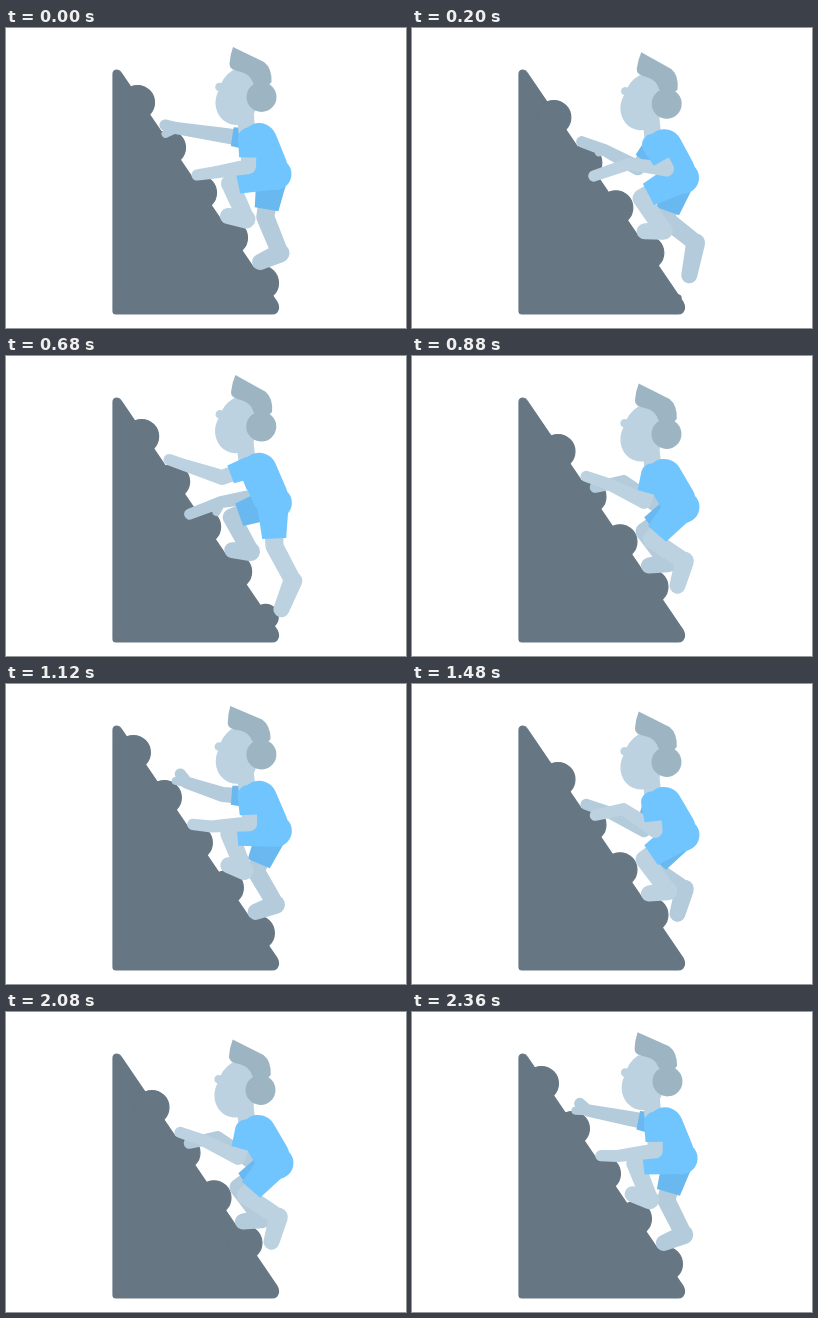
An HTML page for the animation above (2400 ms loop, 400x300 px).

```html
<!DOCTYPE html>
<html lang="en">
<head>
<meta charset="utf-8">
<title>Climber</title>
<style>
html, body { margin: 0; width: 100%; height: 100%; overflow: hidden; background: #fff; }
svg { display: block; width: 400px; height: 300px; }
.rock { fill: #667683; stroke: #667683; stroke-width: 1.2; }
.skin { fill: #bcd2e0; }
.skin.far { fill: #b3cbdb; }
.cloth { fill: #70c5ff; }
.cloth.far { fill: #69b9f0; }
.hair { fill: #9db5c3; }
</style>
</head>
<body>
<svg viewBox="0 0 400 300">
  <path class="rock" d="M107 46Q107 42 111 42Q113.5 42 115 44.5L271 274Q274 280 271 284Q269 286 266 286H110Q107 286 107 283Z"/>
  <path class="rock" id="rocks"/>
  <path class="skin far" id="farArm"/>
  <path class="cloth far" id="farSleeve"/>
  <path class="skin far" id="farLeg"/>
  <path class="cloth far" id="farShorts"/>
  <path class="skin" id="neck"/>
  <g id="head">
    <path class="skin" d="M213 62Q216 49 227 42L248 46L250.500 75A20.500 22 0 0 1 209.500 75Q209.500 68 213 62Z"/>
    <circle class="skin" cx="213.500" cy="59" r="4.300"/>
    <path class="hair" d="M227 19L258 34Q266 40 265.500 54L256 64L247 55Q244 46 235 44Q223 42 223.500 36Q224 27 227 19Z"/>
    <circle class="hair" cx="255.500" cy="69" r="15"/>
  </g>
  <path class="skin" id="nearLeg"/>
  <path class="cloth" id="nearShorts"/>
  <path class="cloth" id="torso"/>
  <path class="skin" id="nearArm"/>
  <path class="cloth" id="nearSleeve"/>
</svg>
<script>
const LOOP = 2400, STRIDE = 1200, STEP = 600, TICK = 40;

// Bézier points: "hold" rides down with the rock, "reach" moves up to the next one
const WRIST = {
  reach: [[205, 145], [240, 158], [194, 86], [170, 100]],
  hold: [[170, 100], [211, 138], [205, 145]]
};
const FINGERS = {
  reach: [[191, 147], [164, 198], [209, 58], [159, 97]],
  hold: [[159, 97], [191, 147]]
};
const HEEL = {
  reach: [[274, 225], [325, 233], [221, 169], [240, 191]],
  hold: [[240, 191], [274, 225]]
};
const TOE = {
  reach: [[254, 234], [333, 312], [206, 146], [222, 188]],
  hold: [[222, 188], [254, 234]]
};

const el = id => document.getElementById(id);
const set = (id, d) => el(id).setAttribute('d', d);
const clamp = (v, lo = 0, hi = 1) => Math.max(lo, Math.min(hi, v));
const mix = (p, q, k) => [p[0] + (q[0] - p[0]) * k, p[1] + (q[1] - p[1]) * k];
const fmt = p => p[0].toFixed(2) + ' ' + p[1].toFixed(2);
const polar = (p, r, a) => [p[0] + r * Math.cos(a), p[1] + r * Math.sin(a)];
const angle = (p, q) => Math.atan2(q[1] - p[1], q[0] - p[0]);
const dist = (p, q) => Math.hypot(q[0] - p[0], q[1] - p[1]);

const bezier = (pts, u) => pts.length === 1 ? pts[0]
  : bezier(pts.slice(1).map((p, i) => mix(pts[i], p, u)), u);

// middle joint of a two-bone chain, bent to the given side
function bend(from, to, l1, l2, side) {
  const d = dist(from, to);
  const a = Math.acos(clamp((l1 * l1 + d * d - l2 * l2) / (2 * l1 * d), -1, 1));
  return polar(from, l1, angle(from, to) + side * a);
}

// outline around two circles
function limb(p, r, q, s) {
  const a = angle(p, q);
  const b = Math.acos(clamp((r - s) / (dist(p, q) || 1), -1, 1));
  const big = b < Math.PI / 2 ? 1 : 0;
  return `M${fmt(polar(p, r, a + b))}A${r} ${r} 0 ${big} 1 ${fmt(polar(p, r, a - b))}` +
    `L${fmt(polar(q, s, a - b))}A${s} ${s} 0 ${1 - big} 1 ${fmt(polar(q, s, a + b))}Z`;
}

// round at p, cut straight at q
function cuff(p, r, q, s) {
  const a = angle(p, q), h = Math.PI / 2;
  return `M${fmt(polar(p, r, a + h))}A${r} ${r} 0 0 1 ${fmt(polar(p, r, a - h))}` +
    `L${fmt(polar(q, s, a - h))}L${fmt(polar(q, s, a + h))}Z`;
}

function drawArm(side, phase, shoulder) {
  const u = phase / STEP % 1, part = phase < STEP ? 'reach' : 'hold';
  const wrist = bezier(WRIST[part], u), tip = bezier(FINGERS[part], u);
  const elbow = bend(shoulder, wrist, 28, 38, -1);
  let d = limb(shoulder, 8, elbow, 7.5) + limb(elbow, 7.5, wrist, 6) + limb(wrist, 6, tip, 5.6);
  if (side === 'far') {
    const grip = Math.abs(Math.cos(2 * Math.PI * phase / STRIDE));
    const thumb = polar(wrist, 12 * grip, angle(wrist, tip) - Math.PI / 4);
    d += limb(wrist, 5, thumb, 4);
  }
  set(side + 'Arm', d);
  const end = polar(shoulder, 19, angle(shoulder, elbow));
  set(side + 'Sleeve', cuff(shoulder, 11, end, 9.5));
}

function drawLeg(side, phase, hip) {
  const u = phase / STEP % 1, part = phase < STEP ? 'hold' : 'reach';
  const heel = bezier(HEEL[part], u), toe = bezier(TOE[part], u);
  const knee = bend(hip, heel, 43.5, 39, 1);
  set(side + 'Leg', limb(hip, 10, knee, 9) + limb(knee, 9, heel, 8.5) + limb(heel, 9.5, toe, 8));
  set(side + 'Shorts', cuff(hip, 16, mix(hip, knee, 0.82), 12));
}

function drawRocks(t) {
  let d = '';
  for (let k = -1; k < 5; k++) {
    const u = k + t / STEP % 1;
    const r = 17 * clamp((u + 0.45) / 0.22) * clamp((4.4 - u) / 0.36);
    const c = [131.5 + 31 * u, 74.5 + 45.1 * u];
    if (r > 0) d += limb(c, r, c, r);
  }
  set('rocks', d);
}

function draw(t) {
  const w = 2 * Math.PI * t / STEP, c = Math.cos(w), s = Math.sin(w);
  const near = t % STRIDE, far = (t + STEP) % STRIDE;
  const hip = [267.5 - c, 148.5 - 2.5 * c];
  const chest = [252.5 + 0.5 * c, 117 - 4 * c];
  const shoulder = [241.5 + 1.5 * c, 114.5 - 4 * c];
  const drop = 4.5 * (1 - c);

  drawRocks(t);
  drawArm('far', far, [shoulder[0] + 2, shoulder[1] + 1]);
  drawLeg('far', far, hip);
  set('neck', limb([239, 84 + drop], 8.5, [241, 104 + drop], 8.5));
  el('head').setAttribute('transform', `translate(${-(1 - c) / 2} ${drop}) rotate(${4 * s} 255 68)`);
  drawLeg('near', near, hip);
  const waist = [hip[0] - 3, hip[1] - 7], seat = [hip[0] + 3, hip[1]];
  set('torso', limb(chest, 18, waist, 18) + limb(seat, 16, seat, 16));
  drawArm('near', near, shoulder);
}

function frame() {
  draw(Math.floor(performance.now() % LOOP / TICK) * TICK);
  requestAnimationFrame(frame);
}
draw(0);
requestAnimationFrame(frame);
</script>
</body>
</html>
```
